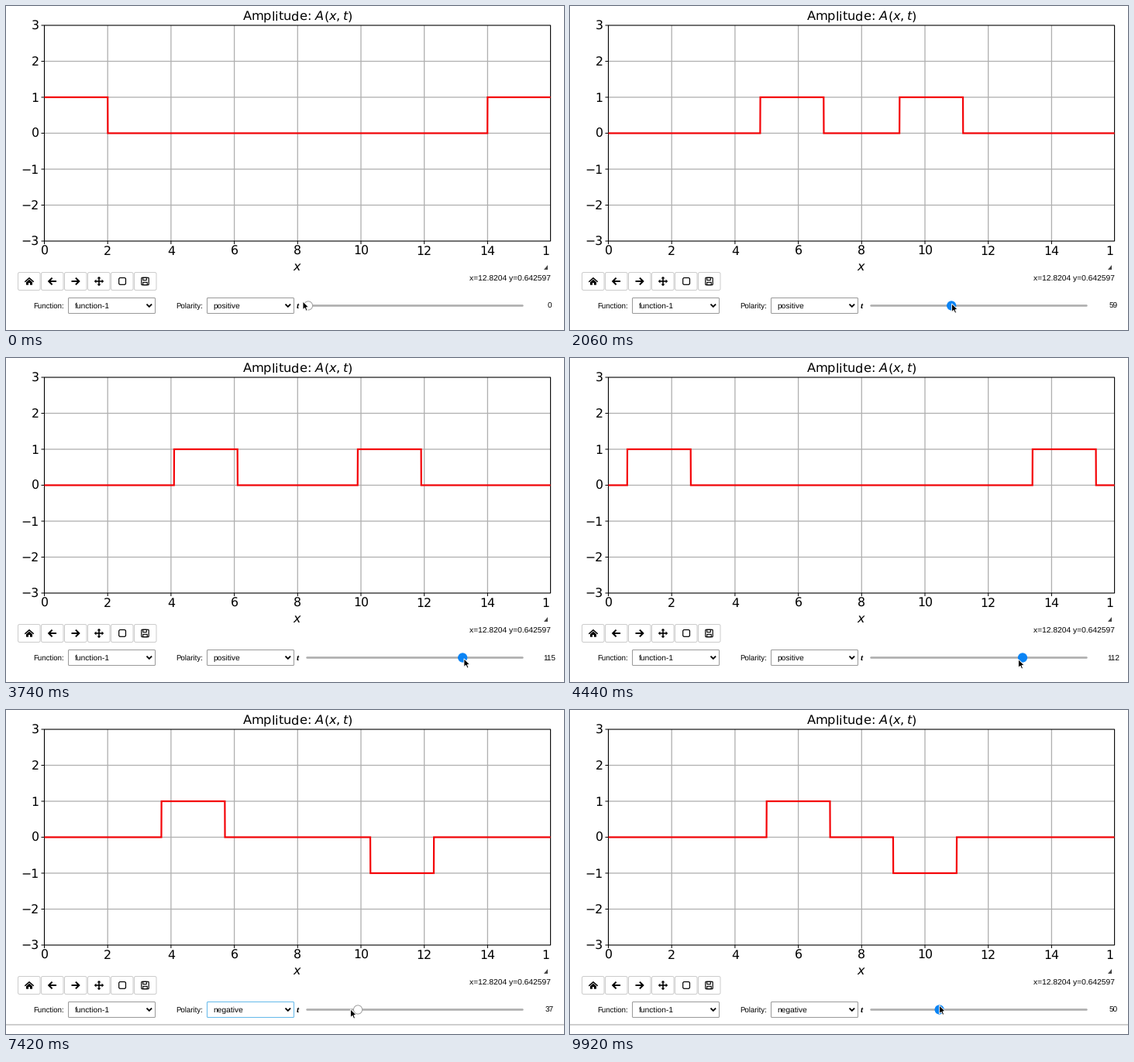
A matplotlib script that plays this animation: 720x419 px, repeating every 10000 ms.

```python
import numpy as np
import matplotlib.pyplot as plt
from matplotlib.animation import FuncAnimation
from matplotlib.collections import LineCollection
from matplotlib.patches import Circle, FancyBboxPatch, Polygon, Rectangle

W, H, DPI = 720, 419, 100
STEP, LOOP = 20, 10000
PT = 72 / DPI
LEFT, ZERO, UX, UY = 49.5, 164.5, 40.85, 46.5
RIGHT, TOP, BOTTOM = 702.6, ZERO - 3 * UY, ZERO + 3 * UY
INK, BLUE = "black", "#0a84f5"

# slider drag: key times in ms and values, joined by a monotone curve
TIMES = np.array([400, 1760, 2060, 2760, 3040, 3760, 3940, 4440,
                  4660, 5260, 5840, 7800, 8900, 9660])
VALUES = np.array([0, 48, 59, 64, 80, 116, 141, 112,
                   45, 42, 37, 37, 98, 50])
OPEN_MENU, FLIP, GRAB_AGAIN = 6560, 6860, 7560
LAG, REDRAW, LEAD = 240, 100, 20

plt.rcParams["text.hinting"] = "none"
fig = plt.figure(figsize=(W / DPI, H / DPI), dpi=DPI, facecolor="white")
ax = fig.add_axes([0, 0, 1, 1])
ax.set(xlim=(0, W), ylim=(H, 0))
ax.axis("off")


def line(pts, width=1.0, color=INK, **kw):
    kw.setdefault("solid_capstyle", "butt")
    return ax.plot(*zip(*pts), color=color, lw=width * PT, snap=False,
                   solid_joinstyle="miter", **kw)[0]


def lines(segments, width, color, z):
    ax.add_collection(LineCollection(segments, colors=color, snap=False,
                                     linewidths=width * PT, zorder=z))


def label(x, y, text, size=10.0, font="Liberation Sans", ha="left", **kw):
    return ax.text(x, y, text, fontsize=size * PT, family=font, ha=ha,
                   va="baseline", color=INK, **kw)


def box(x, y, w, h, edge, radius=2, width=1.0):
    return ax.add_patch(FancyBboxPatch(
        (x, y), w, h, boxstyle=f"round,pad=0,rounding_size={radius}",
        fc="white", ec=edge, lw=width * PT))


def shape(pts, color=INK):
    ax.add_patch(Polygon(pts, closed=True, fc=color, lw=0))


def draw_plot():
    tick_font = dict(size=15.7, font="DejaVu Sans")
    xt = [LEFT + x * UX for x in range(0, 15, 2)]
    yt = [ZERO - y * UY for y in range(-3, 4)]
    lines([[(x, TOP), (x, BOTTOM)] for x in xt[1:]]
          + [[(LEFT, y), (RIGHT, y)] for y in yt[1:-1]], 1.3, "#b0b0b0", 1)
    lines([[(x, BOTTOM), (x, BOTTOM + 4)] for x in xt]
          + [[(LEFT - 4, y), (LEFT, y)] for y in yt], 1, INK, 2)
    for i, x in enumerate(xt):
        label(x, 322, str(2 * i), ha="center", **tick_font)
    label(701.7, 322, "1", ha="right", **tick_font)
    for i, y in enumerate(yt):
        label(42.7, y + 5.7, str(i - 3).replace("-", "\u2212"), ha="right",
              **tick_font)
    ax.add_patch(Rectangle((LEFT, TOP), RIGHT - LEFT, BOTTOM - TOP, snap=False,
                           fill=False, ec=INK, lw=1.1 * PT, zorder=3))
    label(376.5, 19, "Amplitude: $A(x, t)$", 16.2, "DejaVu Sans", "center")
    label(376.3, 342, "$x$", 16, "DejaVu Sans", "center")
    shape([(699, 335), (699, 340.5), (693.5, 340.5)], "#444444")


def draw_toolbar():
    for i in range(6):
        box(15.5 + 30 * i, 344.5, 28.5, 23, "#cccccc")
    cy = 356
    # home
    line([(24.3, cy + 0.8), (30, cy - 4.2), (35.7, cy + 0.8)], 1.5)
    shape([(26, cy + 1.2), (30, cy - 2.3), (34, cy + 1.2), (34, cy + 4.7),
           (26, cy + 4.7)])
    shape([(29, cy + 1.8), (31, cy + 1.8), (31, cy + 4.8), (29, cy + 4.8)],
          "white")
    # back and forward
    for x, d in ((60, -1), (89.5, 1)):
        line([(x - 5 * d, cy), (x + 4.5 * d, cy)], 2)
        line([(x + 0.4 * d, cy - 4.4), (x + 4.8 * d, cy),
              (x + 0.4 * d, cy + 4.4)], 2)
    # pan
    cx = 120
    for dx, dy in ((1, 0), (-1, 0), (0, 1), (0, -1)):
        line([(cx, cy), (cx + 4.5 * dx, cy + 4.5 * dy)], 1.6)
        shape([(cx + 6.2 * dx, cy + 6.2 * dy),
               (cx + 3.6 * dx + 2.5 * dy, cy + 3.6 * dy + 2.5 * dx),
               (cx + 3.6 * dx - 2.5 * dy, cy + 3.6 * dy - 2.5 * dx)])
    # zoom and save
    box(145.7, cy - 4.5, 8.8, 8.8, INK, 1.8, 1.2)
    box(174.8, cy - 4.7, 9.4, 9.4, INK, 1, 1.2)
    box(176.8, cy - 4.7, 4.5, 3.3, INK, 0.2, 1.1)
    box(176.8, cy + 1.3, 5.4, 3.4, INK, 0.2, 1.1)
    label(703, 355.5, "x=12.8204 y=0.642597", 10.2, ha="right")


def draw_select(x, text):
    frame = box(x, 377.5, 112, 20, "#999999", 1)
    line([(x + 101, 385.6), (x + 104.3, 388.9), (x + 107.6, 385.6)], 1.8)
    return frame, label(x + 8.3, 391, text, 10.2)


draw_plot()
draw_toolbar()
label(35, 391, "Function:", 9.6)
label(219, 391, "Polarity:", 9.6)
draw_select(80.5, "function-1")
polarity_box, polarity_text = draw_select(259.5, "positive")
label(376.3, 391, "t", 11.5, "Liberation Serif", "center",
      style="italic", weight="bold")
line([(388.5, 387.5), (666.5, 387.5)], 2.6, "#adadad",
     solid_capstyle="round")
divider = line([(0, 407), (W, 407)], 1.6, "#c4c4c4")

xs = np.linspace(0, 16, 3201)
wave = line([(0, 0)], 2.2, "#f40408", zorder=4)
handle = ax.add_patch(Circle((390, 387.5), 5.6, lw=PT, zorder=5))
counter = label(701, 391, "0", 10, ha="center")
ARROW = np.array([(0, 0), (0, 10.8), (2.5, 8.5), (4.2, 12.3), (6, 11.5),
                  (4.4, 7.8), (7.7, 7.6)])
pointer = ax.add_patch(Polygon(ARROW, closed=True, fc="black", ec="white",
                               lw=0.9 * PT, zorder=10))

# tangents: harmonic mean of neighbouring slopes, flat at turning points
rise = np.diff(VALUES) / np.diff(TIMES)
product = rise[:-1] * rise[1:]
total = np.where(product > 0, rise[:-1] + rise[1:], 1)
TANGENTS = np.pad(np.where(product > 0, 2 * product / total, 0), 1)


def slider_at(ms):
    ms = np.clip(ms, TIMES[0], TIMES[-1])
    k = min(np.searchsorted(TIMES, ms, "right") - 1, len(TIMES) - 2)
    span = TIMES[k + 1] - TIMES[k]
    u = (ms - TIMES[k]) / span
    s = u * u * (3 - 2 * u)
    bend = u * (1 - u) * ((1 - u) * TANGENTS[k] - u * TANGENTS[k + 1])
    return VALUES[k] + s * (VALUES[k + 1] - VALUES[k]) + span * bend


def slider_x(value):
    return 390 + 1.732 * value


def ease(ms, start, end):
    u = np.clip((ms - start) / (end - start), 0, 1)
    return u * u * (3 - 2 * u)


def pulse(start):
    return ((xs >= start - 1e-6) & (xs <= start + 2 + 1e-6)).astype(float)


def pointer_at(ms):
    # slightly ahead of the handle, with one trip to the polarity menu
    x = slider_x(slider_at(ms + LEAD)) - 7 * (1 - ease(ms, 0, 400))
    y = 386 - 4 * np.cos(2 * np.pi * ms / LOOP)
    away = ease(ms, 6260, 6840) - ease(ms, 7200, 7460)
    return x + away * (304 - x), y + away * (397 - y)


def update(i):
    ms = i * STEP
    value = round(float(slider_at(ms)))

    # the curve redraws in coarse ticks, a little behind the slider
    shown = round(float(slider_at(ms // REDRAW * REDRAW - LAG))) / 10
    negative = ms >= FLIP
    amp = pulse(shown) + (-1 if negative else 1) * pulse(14 - shown)
    wave.set_data(np.minimum(LEFT + xs * UX, RIGHT), ZERO - amp * UY)

    active = 300 <= ms < OPEN_MENU or ms >= GRAB_AGAIN
    handle.center = slider_x(value), 387.5
    handle.set_facecolor(BLUE if active else "white")
    handle.set_edgecolor(BLUE if active else "#a0a0a0")
    counter.set_text(str(value))

    focused = OPEN_MENU <= ms < GRAB_AGAIN
    polarity_box.set_edgecolor("#64b9ea" if focused else "#999999")
    polarity_text.set_text("negative" if negative else "positive")
    divider.set_visible(negative)
    pointer.set_xy(ARROW + pointer_at(ms))
    return wave, handle, counter, polarity_box, polarity_text, divider, pointer


anim = FuncAnimation(fig, update, frames=LOOP // STEP, interval=STEP,
                     repeat=True, repeat_delay=0, blit=False)
plt.show()
```
